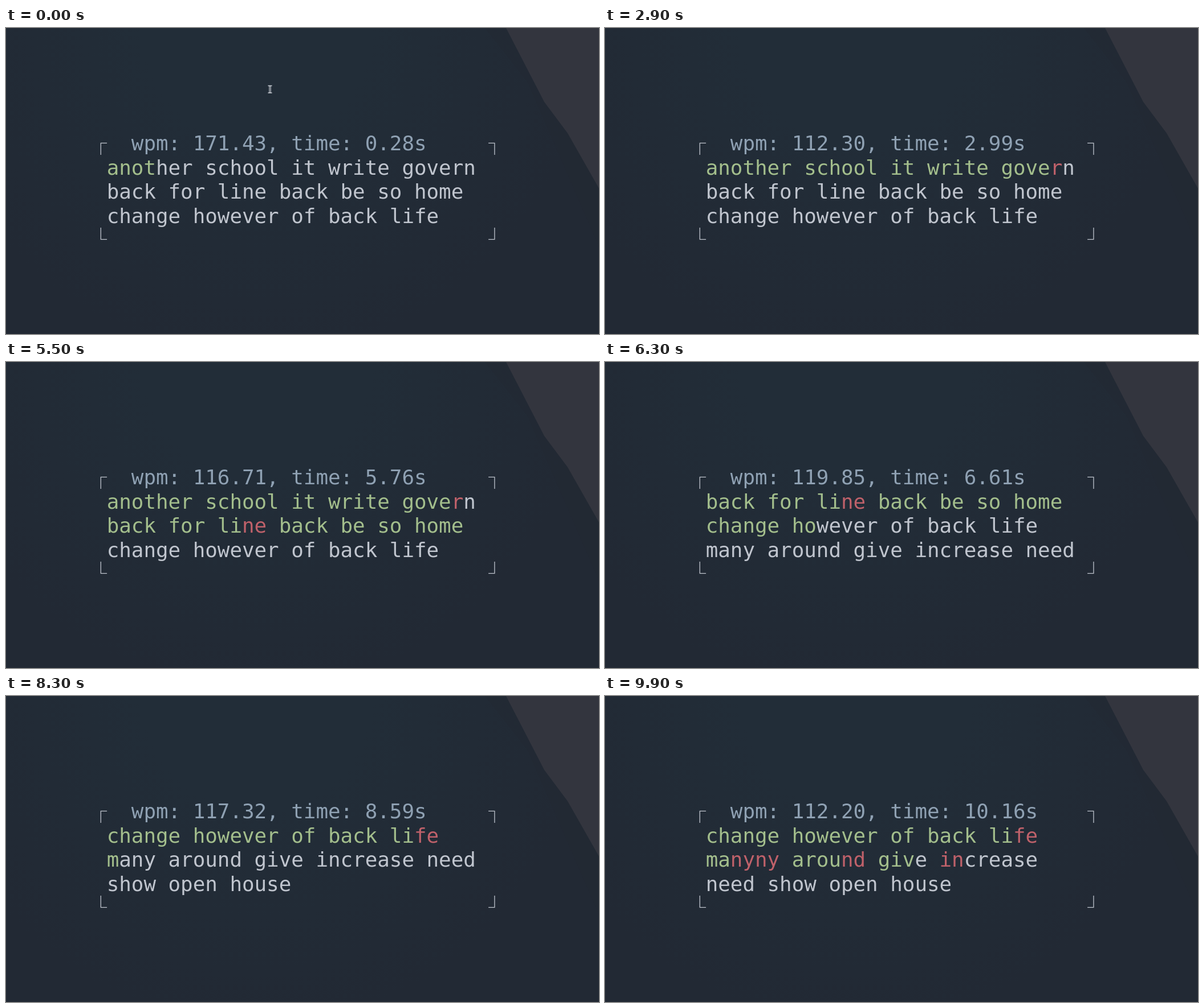
Recreate the animation shown at these times as an HTML page with a canvas. Size 1040x538 px, loop 10000 ms.

```html
<!DOCTYPE html>
<html lang="en">
<head>
<meta charset="utf-8">
<title>Typing test</title>
<style>
  html, body { margin: 0; width: 100%; height: 100%; overflow: hidden; background: #222b36; }
  canvas { display: block; }
</style>
</head>
<body>
<canvas id="stage" width="1040" height="538"></canvas>
<script>
const ctx = document.getElementById('stage').getContext('2d');

const LOOP = 10000, STEP = 100, POINTER_HIDES = 2200;
const COLUMNS = 30, CELL = 21.57, LEFT = 176.7, BASELINE = 215.2, LINE = 42.5;
const COLOR = { text: '#c0c5ce', header: '#8fa1b3', right: '#a3be8c', wrong: '#bf616a' };

const words = ('another school it write govern back for line back be so home ' +
  'change however of back life many around give increase need show open house').split(' ');

// Bursts of evenly paced keys and the second at which each ends; capitals are wrong keys.
const bursts = [
  ['anot', 0.28],
  ['her school it ', 1.768],
  ['write goveR', 2.992],
  [' ', 3.29],
  ['back for liNE back b', 4.992],
  ['e so home change ho', 6.6083],
  ['wever of back liFE m', 8.5919],
  ['aNYNY arouND giv IN', 10.1604],
];
const CLOCK_LEAD = 0.31;

const presses = bursts.flatMap(([text, end], i) => {
  const begin = i ? bursts[i - 1][1] : 0;
  return [...text].map((key, k) =>
    ({ key, time: begin + (end - begin) * (k + 1) / text.length }));
});

function shape(color, points) {
  ctx.fillStyle = color;
  ctx.beginPath();
  points.forEach(([x, y]) => ctx.lineTo(x, y));
  ctx.fill();
}

function line(color, width, points) {
  ctx.strokeStyle = color;
  ctx.lineWidth = width;
  ctx.beginPath();
  points.forEach(([x, y]) => ctx.lineTo(x, y));
  ctx.stroke();
}

function drawBackdrop() {
  const glow = ctx.createRadialGradient(440, 0, 200, 440, 0, 580);
  glow.addColorStop(0, '#222d38');
  glow.addColorStop(1, '#222934');
  ctx.fillStyle = glow;
  ctx.fillRect(0, 0, 1040, 538);

  shape('rgba(36, 41, 52, 0.4)', [[840, 0], [915, 95], [1040, 385], [1040, 0]]);
  shape('#33353e', [[877, 0], [944, 130], [985, 185], [1040, 282], [1040, 0]]);
}

function drawFrame() {
  for (const [x, inX] of [[166.3, 1], [856.9, -1]]) {
    for (const [y, inY] of [[202.4, 1], [371.6, -1]]) {
      line(COLOR.text, 1.3, [[x + inX * 10.8, y], [x, y], [x, y + inY * 20.5]]);
    }
  }
}

function drawPointer() {
  const light = '#c8cdd4';
  for (const y of [101.5, 114]) line(light, 1.5, [[459.5, y], [466.5, y]]);
  line(light, 3.4, [[463, 102], [463, 114]]);
  line('#2b333d', 1.2, [[463, 102.5], [463, 113]]);
}

function put(char, column, row, color) {
  ctx.fillStyle = color;
  ctx.fillText(char, LEFT + column * CELL, BASELINE + row * LINE);
}

function keyColor(key) {
  if (!key) return COLOR.text;
  return key === key.toLowerCase() ? COLOR.right : COLOR.wrong;
}

// Wraps the words, including surplus keys, into lines of { char, color } lists.
function layout(typedWords) {
  const lines = [];
  let width = Infinity, currentLine = 0;
  words.forEach((word, index) => {
    const typed = typedWords[index] || '';
    const glyphs = Array.from({ length: Math.max(word.length, typed.length) }, (_, i) =>
      ({ char: word[i] || typed[i].toLowerCase(), color: keyColor(typed[i]) }));
    if (width + 1 + glyphs.length > COLUMNS) {
      lines.push([]);
      width = -1;
    }
    lines[lines.length - 1].push(glyphs);
    width += 1 + glyphs.length;
    if (index === typedWords.length - 1) currentLine = lines.length - 1;
  });
  return { lines, currentLine };
}

function drawTest(ms) {
  const done = presses.filter(press => press.time <= ms / 1000 + CLOCK_LEAD);
  const typed = done.map(press => press.key).join('');
  const seconds = done[done.length - 1].time;
  const wpm = typed.replace(/[A-Z]/g, '').length / 5 / (seconds / 60);

  ctx.font = '35.83px "DejaVu Sans Mono", monospace';
  const header = `wpm: ${(wpm).toFixed(2)}, time: ${seconds.toFixed(2)}s`;
  [...header].forEach((char, i) => put(char, i + 2, 0, COLOR.header));

  const { lines, currentLine } = layout(typed.split(' '));
  const top = Math.max(0, currentLine - 1);
  lines.slice(top, top + 3).forEach((lineWords, row) => {
    let column = 0;
    for (const glyphs of lineWords) {
      for (const { char, color } of glyphs) put(char, column++, row + 1, color);
      column++;
    }
  });
}

const start = performance.now();
function render() {
  const elapsed = (performance.now() - start) % LOOP;
  drawBackdrop();
  drawFrame();
  if (elapsed < POINTER_HIDES) drawPointer();
  drawTest(Math.floor(elapsed / STEP) * STEP);
  requestAnimationFrame(render);
}
render();
</script>
</body>
</html>
```
